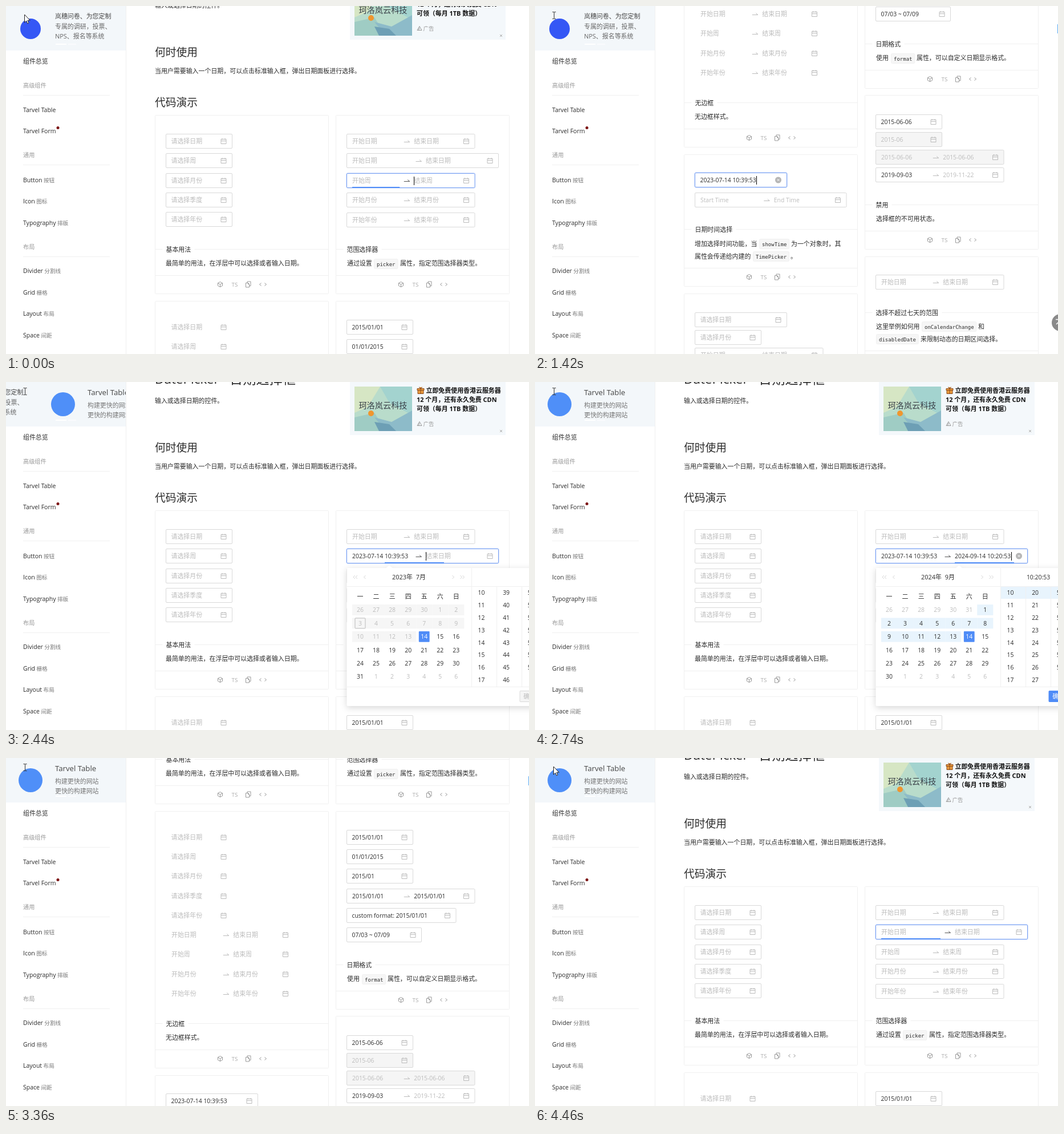
An HTML page that plays this animation: 917 by 610 pixels, repeating every 4580 ms.

```html
<!DOCTYPE html>
<html lang="zh-CN">
<head>
<meta charset="utf-8">
<title>日期选择框</title>
<style>
html, body { margin: 0; width: 100%; height: 100%; overflow: hidden; background: #fff; }
svg { display: block; width: 917px; height: 610px; }
text { font-family: "Open Sans", "Noto Sans CJK SC", "Noto Sans CJK", sans-serif; white-space: pre; }
.code { font-family: "DejaVu Sans Mono", monospace; }
.pop { filter: drop-shadow(0 3px 6px rgba(0, 0, 0, .16)); }
</style>
</head>
<body>
<svg id="stage" viewBox="0 0 917 610"></svg>
<script>
const LOOP = 4580;
const INK = '#2b2b2b', MUTED = '#8c8c8c', HINT = '#bcbcbc', EDGE = '#d9d9d9', RULE = '#f0f0f0', BLUE = '#4f8cf7';
const LEFT = 261.5, RIGHT = 578.5;
const START = '2023-07-14 10:39:53', END = '2024-09-14 10:20:53';

// Drawing helpers; the y of text and icons is their visual centre.
const rect = (x, y, w, h, fill, stroke = 'none', r = 0) =>
  `<rect x="${x}" y="${y}" width="${w}" height="${h}" rx="${r}" fill="${fill}" stroke="${stroke}"/>`;
const circle = (x, y, r, fill) => `<circle cx="${x}" cy="${y}" r="${r}" fill="${fill}"/>`;
const path = (d, stroke, fill = 'none', width = 1) =>
  `<path d="${d}" stroke="${stroke}" fill="${fill}" stroke-width="${width}"/>`;
const move = (x, y, body, extra = '') => `<g transform="translate(${x} ${y}) ${extra}">${body}</g>`;
const fade = (opacity, body) => `<g opacity="${opacity}">${body}</g>`;
const hline = (x1, x2, y, color = RULE) => rect(x1, y, x2 - x1, 1, color);
const text = (x, y, str, fill = INK, { size, weight = 400, anchor = 'start', cls = '' } = {}) => {
  size = size || (/[\u3000-\u9fff]/.test(str) ? 10.95 : 10.4);
  return `<text x="${x}" y="${(y + size * .37).toFixed(2)}" font-size="${size}" fill="${fill}" font-weight="${weight}" text-anchor="${anchor}" class="${cls}">${str}</text>`;
};
const mid = (x, y, str, fill, opts) => text(x, y, str, fill, { anchor: 'middle', ...opts });
const code = (x, y, str) =>
  rect(x + .5, y - 8.5, str.length * 5.4 + 9, 17, '#f6f6f6', RULE, 2) + text(x + 5, y + 1, str, INK, { size: 9, cls: 'code' });
const rows = (count, first, step, draw) =>
  Array.from({ length: count }, (_, i) => draw(Math.round(first + step * i), i)).join('');

const calendar = (x, y) => move(x, y, path('M-4.5-3.5h9v8h-9zM-4.5-.5h9M-2.5-5v2.5M2.5-5v2.5', HINT));
const clearMark = (x, y) => move(x, y, circle(0, 0, 5.5, '#b5b5b5') + path('M-2-2l4 4M2-2l-4 4', '#fff'));
const swap = (x, y, color) => move(x, y, path('M-5 1.5H5L1.5-1.5', color));

// Form fields
function field(x, y, w, o) {
  let out = '';
  if (o.focus) out += rect(x - 1, y - 13.5, w + 2, 27, 'none', '#dbe6fd', 3);
  if (!o.bare) out += rect(x, y - 12.5, w, 25, o.off ? '#f5f5f5' : '#fff', o.focus ? '#769ff2' : EDGE, 1.5);
  out += (o.clear ? clearMark : calendar)(x + w - 15, y);
  if (o.bar) out += rect(o.bar, y + 11, w / 2 - 29, 2, BLUE);
  return out + (o.caret ? rect(o.caret, y - 7, 1, 15, '#000') : '');
}
const tone = str => /^(\d|custom)/.test(str) ? INK : HINT;
const picker = (x, y, w, str, o = {}) =>
  field(x, y, w, o) + text(x + 9, y, str, o.off ? HINT : tone(str));
function range(x, y, w, from, to, o = {}) {
  const arrow = x + w / 2 - 7;
  return field(x, y, w, o) + text(x + 9.5, y, from, o.off ? HINT : tone(from))
    + swap(arrow, y, o.focus ? '#555' : HINT)
    + text(arrow + 12.5, y, to, o.off || o.endOff ? HINT : tone(to));
}

// Demo card: frame, title on a rule, action icons
function card(x, top, bottom, title, titleY, body) {
  const ruleY = bottom - 32, iconY = bottom - 16;
  return rect(x, top + .5, 304, bottom - top, '#fff', RULE, 1)
    + hline(x, x + 304, titleY - 1) + rect(x + 13, titleY - 7, title.length * 11 + 12, 14, '#fff')
    + text(x + 19, titleY, title) + hline(x, x + 304, ruleY)
    + move(x + 114, iconY, path('M0-4.5l4 2.2v4.6l-4 2.2-4-2.2v-4.6zM-4-2.3L0 0l4-2.3M0 0v4.5', '#999'))
    + mid(x + 139.5, iconY, 'TS', '#aaa', { size: 9.8 })
    + move(x + 163, iconY, path('M-1.5-3v-2h6v7.500h-2M-4-2.500h4l2 2v5.500h-6zM0-2.500v2h2', '#999'))
    + move(x + 189, iconY, path('M-3-2.500l-3 2.500 3 2.500M3-2.500l3 2.500-3 2.500', '#999'))
    + body;
}

const names = ['日期', '周', '月份', '季度', '年份'];
const spans = ['日期', '周', '月份', '年份'];
const L = LEFT + 19, R = RIGHT + 19;

function advert() {
  return rect(603, -30, 273, 123, '#f4f8fb')
    + '<clipPath id="pic"><rect x="611" y="8" width="101" height="78"/></clipPath><g clip-path="url(#pic)">'
    + rect(611, 8, 101, 78, '#b9dccb')
    + path('M611 8h45l-22 36-23 10z', 'none', '#d6e6c4') + path('M712 8v50l-40-22-16-28z', 'none', '#a3d3cf')
    + path('M611 62l35-8 20 32h-55z', 'none', '#9fccc4') + path('M646 62l30 8 36-20v36h-46z', 'none', '#8dbbc9')
    + path('M646 70l26 4 12 12h-30z', 'none', '#6d9fb5') + '</g>'
    + mid(661, 41, '珂洛岚云科技', '#3a4048', { size: 14.2, weight: 500 }) + circle(640, 55, 5, '#f0962e')
    + path('M722 14.500h10v6h-10zM721 11.500h12v3h-12zM727 11v10M724 9l3 2 3-2', '#8a4a1c', '#e99a3c')
    + text(736.500, 15, '立即免费使用香港云服务器', '#111', { weight: 700 })
    + text(720, 31, '12 个月，还有永久免费 CDN', '#111', { weight: 700 })
    + text(720, 47, '可领（每月 1TB 数据）', '#111', { weight: 700 })
    + path('M721 76.500l4-7 4 7zM725 72l-1.500 4', '#999') + text(731.500, 73, '广告', '#999', { size: 9.5 })
    + path('M866 84l4 4M870 84l-4 4', '#aaa');
}

function page(s) {
  const focus = s.focus;
  const rangeField = { focus: focus === 'range' };
  if (rangeField.focus) Object.assign(rangeField, { bar: s.bar, caret: s.caret, clear: s.clear });
  return text(261, -5.5, 'DatePicker', INK, { size: 22.5, weight: 500 })
    + text(392, -5.5, '日期选择框', INK, { size: 23.2, weight: 500 })
    + text(261, 33, '输入或选择日期的控件。') + advert()
    + text(261, 115, '何时使用', INK, { size: 18.75 })
    + text(261, 148, '当用户需要输入一个日期，可以点击标准输入框，弹出日期面板进行选择。')
    + text(261, 203, '代码演示', INK, { size: 18.75 })

    + card(LEFT, 225, 538, '基本用法', 461,
      rows(5, 271, 34.3, (y, i) => picker(L, y, 116, '请选择' + names[i]))
      + text(280, 485, '最简单的用法，在浮层中可以选择或者输入日期。'))
    + card(RIGHT, 225, 538, '范围选择器', 461,
      range(R, 271, 224.5, '开始日期', '结束日期')
      + range(R, 305, 266, s.from || '开始日期', s.to || '结束日期', rangeField)
      + rows(3, 340, 34.3, (y, i) => range(R, y, 224.5, '开始' + spans[i + 1], '结束' + spans[i + 1],
        focus === 'week' && !i ? { focus: true, bar: 607, caret: 715 } : {}))
      + text(598, 485, '通过设置') + code(645, 486, 'picker') + text(691, 485, '属性，指定范围选择器类型。'))

    + card(LEFT, 551, 1001, '无边框', 924,
      rows(9, 597, 34.23, (y, i) => i < 5
        ? picker(L, y, 116, '请选择' + names[i], { bare: true })
        : range(L, y, 224.5, '开始' + spans[i - 5], '结束' + spans[i - 5], { bare: true }))
      + text(280, 948, '无边框样式。'))
    + card(RIGHT, 551, 898, '日期格式', 821,
      ['2015/01/01', '01/01/2015', '2015/01'].map((v, i) => picker(R, 597 + 34 * i, 116, v)).join('')
      + range(R, 700, 224.5, '2015/01/01', '2015/01/01')
      + picker(R, 734, 191.5, 'custom format: 2015/01/01') + picker(R, 768, 131, '07/03 ~ 07/09')
      + text(598, 845, '使用') + code(624, 846, 'format') + text(669, 845, '属性，可以自定义日期显示格式。'))

    + card(LEFT, 1014, 1245, '日期时间选择', 1146,
      picker(L, 1059, 161, s.time || 'Select Time',
        focus === 'time' ? { focus: true, caret: s.time ? 388 : 290, clear: s.time } : {})
      + range(L, 1094, 265.5, 'Start Time', 'End Time')
      + text(280, 1171, '增加选择时间功能，当') + code(393, 1171, 'showTime') + text(449, 1171, '为一个对象时，其')
      + text(280, 1193, '属性会传递给内建的') + code(382, 1193, 'TimePicker') + text(448, 1193, '。'))
    + card(RIGHT, 910, 1180, '禁用', 1103,
      picker(R, 957, 116, '2015-06-06') + picker(R, 988, 116, '2015-06', { off: true })
      + range(R, 1019, 224.5, '2015-06-06', '2015-06-06', { off: true })
      + range(R, 1050, 224.5, '2019-09-03', '2019-11-22', { endOff: true })
      + text(598, 1127, '选择框的不可用状态。'))

    + card(LEFT, 1258, 1500, '', 1450,
      picker(L, 1304, 161, '请选择日期') + picker(L, 1335, 116, '请选择月份')
      + range(L, 1366, 224.5, '开始日期', '结束日期'))
    + card(RIGHT, 1193, 1390, '选择不超过七天的范围', 1292,
      range(R, 1238, 224.5, '开始日期', '结束日期')
      + text(598, 1316, '这里举例如何用') + code(678, 1316, 'onCalendarChange') + text(777, 1316, '和')
      + code(598, 1338, 'disabledDate') + text(676, 1338, '来限制动态的日期区间选择。'));
}

function sidebar(ad) {
  const item = (y, en, zh = '') =>
    text(30, y, `${en}<tspan font-size="9.6" fill="#777"> ${zh}</tspan>`, INK, { size: 10.5 });
  const group = (y, str) => text(30, y, str, '#999', { size: 10.2 }) + hline(30, 182, y + 17);
  const slides = circle(43, 40, 18, '#3557f5')
    + text(86, 18, '岚穗问卷、为您定制', '#444', { weight: 500 })
    + text(86, 36, '专属的调研，投票、', '#666') + text(86, 53, 'NPS、报名等系统', '#666')
    + move(211, 0, circle(43, 39, 21, '#4f8ff8') + text(86, 18, 'Tarvel Table', '#444', { size: 13.2 })
      + text(86, 41, '构建更快的网站', '#777') + text(86, 58, '更快的构建网站', '#777'));
  return rect(0, 0, 210, 610, '#fff') + rect(210, 0, 1, 610, RULE)
    + '<clipPath id="side"><rect width="210" height="78"/></clipPath><g clip-path="url(#side)">'
    + rect(0, 0, 210, 78, '#f3f7fa') + move(-211 * ad, 0, slides)
    + rect(87, 66, 19, 2, '#fff') + fade(.6, rect(109, 66, 14, 2, '#fff')) + '</g>'
    + text(30, 97, '组件总览') + group(139, '高级组件') + item(182, 'Tarvel Table') + item(219, 'Tarvel Form')
    + circle(91, 213.5, 2.5, '#7c1414') + group(261, '通用') + item(305, 'Button', '按钮') + item(342, 'Icon', '图标')
    + item(380, 'Typography', '排版') + group(422, '布局') + item(464, 'Divider', '分割线')
    + item(502, 'Grid', '栅格') + item(539, 'Layout', '布局') + item(577, 'Space', '间距');
}

// Calendar and clock popup
function popup(p) {
  const [year, month] = p.month, lead = (new Date(year, month - 1, 1).getDay() + 6) % 7;
  const cell = 18.8, dayX = i => 23.5 + 28.05 * i;
  const chevron = (x, dir) => path(`M${x + dir * 1.5} 13l${-dir * 3} 3l${dir * 3} 3`, p.tip ? '#d5d5d5' : '#aaa');
  let out = rect(0, 0, 349, 242, '#fff', 'none', 2);
  if (p.tip) out += path(`M${p.tip - 6} .5l6-5 6 5z`, 'none', '#fff');
  out += chevron(13, 1) + chevron(17, 1) + chevron(31.5, 1) + chevron(186.5, -1) + chevron(200.500, -1) + chevron(204.500, -1)
    + mid(109, 16, `${year}年  ${month}月`, INK, { weight: 500 })
    + hline(0, 349, 32) + hline(0, 349, 208) + rect(218.500, 0, 1, 208, RULE)
    + rect(262.500, 32, 1, 176, RULE) + rect(306.500, 32, 1, 176, RULE)
    + [...'一二三四五六日'].map((d, i) => mid(dayX(i), 50, d)).join('');

  for (let i = 0; i < 42; i++) {
    const date = new Date(year, month - 1, 1 - lead + i), day = date.getDate();
    const inside = date.getMonth() === month - 1, before = i - lead + 1 < 14;
    const x = dayX(i % 7), y = 73.5 + 23.4 * Math.floor(i / 7);
    const off = p.offBefore && before, chosen = p.sel && inside && day === 14;
    const today = year === 2023 && month === 7 && inside && day === 3;
    if (off || p.span && inside && before) out += rect(x - 14.05, y - 9.4, 28.1, cell, off ? '#f6f6f6' : '#e8f4fd');
    if (chosen) out += rect(x - 9.4, y - 9.4, cell, cell, BLUE, 'none', 1);
    if (today) out += rect(x - 9, y - 9, 18, 18, 'none', off ? '#bbb' : BLUE, 1);
    out += mid(x, y, day, chosen ? '#fff' : off || !inside ? HINT : INK);
  }

  p.clock.forEach((first, col) => {
    if (p.done) out += rect(219.5 + 44 * col, 33, 43, 21, '#e8f4fd');
    const count = Math.min(8, (col ? 60 : 24) - first);
    for (let i = 0; i < count; i++) out += mid(236 + 43.6 * col, 43.5 + 21.8 * i, first + i);
  });
  if (p.done) out += mid(285, 16, p.clock.join(':'), INK, { weight: 500 });
  if (!p.tip) out += text(9, 225, '此刻', BLUE);
  out += rect(303.5, 215.5, 37, 19, p.done ? BLUE : '#f5f5f5', p.done ? BLUE : EDGE, 1)
    + mid(322, 225, '确 定', p.done ? '#fff' : HINT);
  return `<g class="pop" opacity="${p.show[1]}">${move(p.x, p.y, out, `scale(1 ${p.show[0]})`)}</g>`;
}

const cursors = {
  arrow: path('M32.500 15v14l3.200-3 2 4.700 2.200-1-2-4.500h4.300z', '#222', '#fff'),
  beam: path('M30.500 10.500h2.500l.5.5.5-.5h2.500M33.500 11v11M30.500 22.500h2.500l.5-.5.5.5h2.500', '#333')
};
const backTop = circle(921, 555, 15, '#8a8a8a') + path('M913 549.500h10M914 558l6-6', '#fff', 'none', 1.5);

// Popup stages; show is [vertical scale, opacity].
const july = { x: 280, y: 321, month: [2023, 7], clock: [10, 39, 53] };
const picked = { ...july, sel: true, done: true };
const first = { ...july, x: 597.5, y: 326, tip: 17 };
const second = { ...first, sel: true, offBefore: true };
const autumn = { ...first, tip: 146, month: [2024, 9] };
const final = { ...autumn, sel: true, span: true, done: true, clock: [10, 20, 53] };
const shown = (p, scale = 1, opacity = 1, more = {}) => ({ pop: { ...p, ...more, show: [scale, opacity] } });

// Each step lists only what changes at that time.
const steps = [
  [0, { scroll: 34, focus: 'week', cursor: 'arrow', ad: 0, top: 0 }],
  [100, { scroll: 754, focus: 'time' }],
  [600, { cursor: 'beam', top: .5, ...shown(july, .88, .5) }],
  [700, { top: 1, ...shown(july, .99, .93) }],
  [800, shown(july)],
  [920, { time: START, ...shown(picked) }],
  [1120, shown(picked, .985, .96)],
  [1220, shown(picked, .93, .7)],
  [1320, shown(picked, .83, .25)],
  [1420, { pop: null }],
  [1620, { scroll: 620 }],
  [1720, { scroll: 380, top: .4 }],
  [1820, { scroll: 140, top: 0 }],
  [1920, { scroll: 0, focus: 'range', bar: 607, caret: 607 }],
  [2020, shown(first, .9, .6)],
  [2120, shown(first)],
  [2220, { from: START, caret: 706, ...shown(picked, 1, 1, { x: 597.5, y: 326, tip: 17 }) }],
  [2340, { ad: .25, bar: 622, caret: 736, ...shown(second, 1, 1, { tip: 32 }) }],
  [2440, { ad: .73, bar: 664, ...shown(second, 1, 1, { tip: 74.5 }) }],
  [2540, { ad: .97, bar: 736, ...shown(second, 1, 1, { tip: 146 }) }],
  [2640, { ad: 1, ...shown(autumn) }],
  [2740, { to: END, caret: 835, clear: true, ...shown(final) }],
  [2840, { bar: 730 }],
  [2940, { bar: 700, ...shown(final, 1, 1, { tip: 60 }) }],
  [3060, { bar: 644, ...shown(final, .96, .9, { tip: 17 }) }],
  [3160, { bar: 607, ...shown(final, .84, .25, { tip: 17 }) }],
  [3260, { pop: null, scroll: 190 }],
  [3360, { scroll: 458 }],
  [3460, { scroll: 540 }],
  [3560, { scroll: 490 }],
  [3660, { scroll: 320 }],
  [3760, { scroll: 140 }],
  [3860, { scroll: 30, cursor: 'arrow' }],
  [3960, { scroll: 0, caret: 0 }],
  [4060, { from: '', to: '', clear: false, caret: 736 }],
  [4460, { caret: 0 }]
];
const states = [];
steps.forEach(([, change], i) => states.push({ ...states[i - 1], ...change }));

const stage = document.getElementById('stage');
const begin = performance.now();
let current = -1;

function draw(s) {
  stage.innerHTML = move(0, -s.scroll, page(s)) + sidebar(s.ad)
    + (s.scroll > 400 ? rect(916, 32, 1, 16, '#58aaf5') : '')
    + (s.top ? fade(s.top, backTop) : '')
    + (s.pop ? popup(s.pop) : '') + cursors[s.cursor];
}
function tick() {
  const time = (performance.now() - begin) % LOOP;
  const index = steps.filter(([at]) => at <= time).length - 1;
  if (index !== current) draw(states[current = index]);
  requestAnimationFrame(tick);
}
tick();
</script>
</body>
</html>
```
